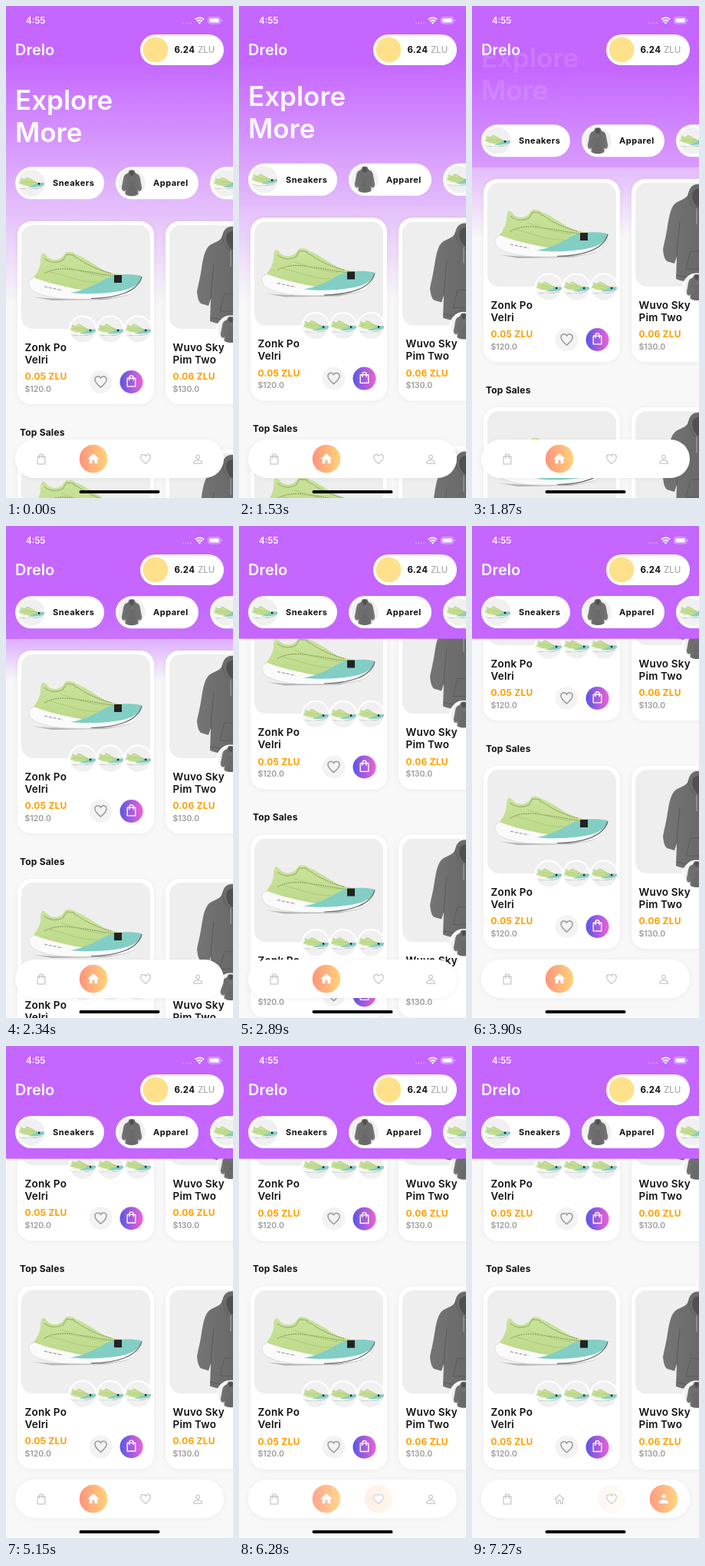
Animation, 296 px wide and 640 px high, one loop 8000 ms. Source, as an HTML page:

```html
<!DOCTYPE html>
<html lang="en">
<head>
<meta charset="utf-8">
<title>Shop screen</title>
<style>
  html, body { margin: 0; width: 100%; height: 100%; overflow: hidden; background: #f8f8f8; }
  svg { display: block; width: 100%; height: 100%; }
  text { font-family: Inter, "Liberation Sans", sans-serif; font-weight: 600; fill: #111; white-space: pre; }
  .panel { fill: #fff; filter: drop-shadow(0 1px 3px rgba(0, 0, 0, .05)); }
  .line { fill: none; stroke: currentColor; stroke-width: 1.8; stroke-linejoin: round; }
  .solid { fill: #fff; }
</style>
</head>
<body>
<svg id="stage" viewBox="0 0 296 640" preserveAspectRatio="none">
  <defs>
    <linearGradient id="glow" gradientUnits="userSpaceOnUse" x1="0" x2="0" y1="70" y2="390">
      <stop stop-color="#c566ff"/><stop offset="1" stop-color="#c566ff" stop-opacity="0"/>
    </linearGradient>
    <linearGradient id="violet"><stop offset=".05" stop-color="#6157e6"/><stop offset="1" stop-color="#f060d6"/></linearGradient>
    <linearGradient id="peach"><stop stop-color="#ff947c"/><stop offset="1" stop-color="#ffd37a"/></linearGradient>
    <linearGradient id="cloth"><stop stop-color="#757575"/><stop offset=".5" stop-color="#696969"/><stop offset="1" stop-color="#757575"/></linearGradient>
    <linearGradient id="knit" x2="0" y2="1"><stop stop-color="#cbe39c"/><stop offset="1" stop-color="#bdd98a"/></linearGradient>
    <clipPath id="round"><circle r="17"/></clipPath>
    <clipPath id="photo"><rect width="168" height="135" rx="15"/></clipPath>

    <g id="shoe">
      <path d="M12 93C40 97 95 97 142 91L110 97 40 98Z" fill="#b4b4b4"/>
      <path d="M10 72C9 78 12 84 18 87 30 93 48 96 65 96 100 97 128 95 143 89 152 84 157 76 157 66L100 70 20 66Z" fill="#fafafa" stroke="#d4d4d4" stroke-width=".7"/>
      <path d="M16 68C21 62 24 55 25 49 25 44 25 40 27 37 30 36 32 38 34 41 39 46 46 46 51 43 55 41 56 37 59 35 63 34 68 35 71 38 78 40 85 45 92 49 102 56 112 62 126 64L155 66C156 72 148 80 130 82 105 86 82 86 62 81 44 77 28 73 16 68Z" fill="url(#knit)"/>
      <path d="M30 43C36 49 46 50 54 46L59 38 68 39 71 43" fill="none" stroke="#a3be72" stroke-width="1.6"/>
      <path d="M64 88C82 85 97 77 111 69 124 64 144 63 156 66 158 74 146 83 128 86 104 90 82 90 64 88Z" fill="#82cec4"/>
      <path d="M30 63C48 53 66 58 82 60 96 62 108 65 120 66M72 42C84 51 101 59 118 63" fill="none" stroke="#7a9150" stroke-width="1" stroke-dasharray="2 1"/>
      <path d="M37 61C58 65 80 76 100 74M52 52C68 58 85 63 109 67" fill="none" stroke="#a3c370" stroke-width=".7"/>
      <path d="M91 95.5C124 95 152 87 157 67" fill="none" stroke="#666" stroke-width="1.2"/>
      <path d="M30 80l24 5" stroke="#999" stroke-width="1.2" stroke-dasharray="4 2"/>
      <rect x="121" y="65" width="10" height="10" fill="#222"/>
    </g>

    <g id="hoodie">
      <path d="M84 2C76 1 71 5 69 14 68 20 60 22 53 26 46 31 44 44 42 56 40 70 37 80 36 87 37 95 38 99 41 102L51 105 54 96 53 125C66 131 102 131 115 125L114 96 117 105 127 102C130 99 131 95 132 87 131 80 128 70 126 56 124 44 122 31 115 26 108 22 100 20 99 14 97 5 92 1 84 2Z" fill="url(#cloth)"/>
      <path d="M75 12C79 6 89 6 93 12 96 22 90 30 84 33 78 30 72 22 75 12Z" fill="#505050"/>
      <path d="M54 96C55 76 57 62 58 50M114 96C113 76 111 62 110 50M66 112L72 89H96L102 112ZM53 120Q84 128 115 120M69 14Q72 33 84 36 96 33 99 14" fill="none" stroke="#5a5a5a" stroke-width="1"/>
      <path d="M80 33V54M88 33V51" stroke="#aaa" stroke-width="1"/>
    </g>

    <path id="bag" d="M5 7h14v14H5zM8.5 11V6a3.5 3.5 0 0 1 7 0v5"/>
    <path id="home" d="M3 12l9-8 9 8M6 10v10h4v-6h4v6h4V10"/>
    <path id="homeFull" d="M10 20v-6h4v6h5v-8h3L12 3 2 12h3v8z"/>
    <path id="heart" d="M12 20.5C6 15.5 3 12.5 3 8.7A4.7 4.7 0 0 1 12 6.3a4.7 4.7 0 0 1 9 2.4C21 12.5 18 15.5 12 20.5z"/>
    <path id="person" d="M12 4.5a3.5 3.5 0 1 0 .01 0zM4.5 20v-2c0-3 5-4.2 7.5-4.2s7.5 1.2 7.5 4.2v2z"/>
  </defs>

  <rect width="296" height="640" fill="#f8f8f8"/>
  <rect id="backdrop" width="296" height="400" fill="url(#glow)"/>
  <g id="content"></g>
  <rect id="header" width="296" fill="#c566ff"/>
  <rect id="bar" width="296" height="78" fill="#c566ff"/>
  <g id="headline"></g>
  <g id="chips"></g>
  <g id="top"></g>
  <g id="nav"></g>
  <rect x="95.5" y="630" width="105" height="4" rx="2"/>
</svg>

<script>
const LOOP = 8000;
const $ = id => document.getElementById(id);
const clamp = (v, lo = 0, hi = 1) => Math.min(hi, Math.max(lo, v));

const label = (x, y, size, str, style = '') =>
  `<text x="${x}" y="${y}" font-size="${size}" style="${style}">${str}</text>`;
const icon = (id, x, y, scale, cls = 'line', color = '#c8c8c8') =>
  `<use href="#${id}" class="${cls}" color="${color}" transform="translate(${x} ${y}) scale(${scale}) translate(-12 -12)"/>`;

// Round thumbnail of a product picture
function thumb(x, y, item, ring) {
  const scale = item === 'shoe' ? .24 : .275;
  return `<g transform="translate(${x} ${y})">
    <circle r="17.5" fill="#f0f0f0" stroke="#fff" stroke-width="${ring}"/>
    <g clip-path="url(#round)"><use href="#${item}" transform="scale(${scale}) translate(-84 -66)"/></g></g>`;
}

function card(x, y, item, lines, price, cost) {
  return `<g transform="translate(${x} ${y})">
    <rect class="panel" width="178" height="238" rx="18"/>
    <g transform="translate(5 5)" clip-path="url(#photo)">
      <rect width="168" height="135" fill="#eee"/><use href="#${item}"/></g>
    ${[85, 121, 157].map(cx => thumb(cx, 141, item, 2)).join('')}
    ${lines.map((line, i) => label(9.5, 168.5 + i * 16, 13.5, line, 'letter-spacing:.2px')).join('')}
    ${label(9.5, 206, 12, price + ' ZLU', 'fill:#ffa000;font-weight:700;letter-spacing:.2px')}
    ${label(9.5, 221.5, 10.5, cost, 'fill:#9c9c9c')}
    <circle cx="108.5" cy="209" r="15" fill="#f3f3f3"/>${icon('heart', 108.5, 209, .83, 'line', '#999')}
    <circle cx="148.5" cy="209" r="15" fill="url(#violet)"/>${icon('bag', 148.5, 208, .76, 'line', '#fff')}
  </g>`;
}

const row = y =>
  card(15, y, 'shoe', ['Zonk Po', 'Velri'], '0.05', '$120.0') +
  card(208, y, 'hoodie', ['Wuvo Sky', 'Pim Two'], '0.06', '$130.0');

const chip = (x, width, item, name) => `
  <rect x="${x}" y="209.3" width="${width}" height="42" rx="21" fill="#fff"/>
  ${thumb(x + 21, 230.3, item, 0)}
  ${label(x + 49, 234.3, 11, name, 'font-weight:700;letter-spacing:.5px')}`;

$('content').innerHTML = row(280) +
  label(18, 558.5, 12, 'Top Sales', 'font-weight:700;letter-spacing:.2px') + row(577);

$('headline').innerHTML = ['Explore', 'More']
  .map((word, i) => label(12, 134.5 + i * 42, 35, word, 'fill:#fff')).join('');

$('chips').innerHTML = chip(12, 116, 'shoe', 'Sneakers') +
  chip(143, 108, 'hoodie', 'Apparel') + chip(266, 116, 'shoe', '');

$('top').innerHTML = label(26, 23, 11.5, '4:55', 'fill:#fff') +
  [0, 1, 2, 3].map(i => `<circle cx="${231 + i * 3.4}" cy="22" r=".8" fill="#fff" opacity=".6"/>`).join('') +
  `<g fill="none" stroke="#fff" stroke-width="1.7">
     <path d="M247 17.5Q252.5 12.8 258 17.5M249 20Q252.5 17 256 20"/></g>
   <path d="M250.5 21.5Q252.5 20 254.5 21.5L252.5 23.5Z" fill="#fff"/>
   <rect x="263.5" y="14.5" width="16" height="8.5" rx="2.5" fill="none" stroke="#fff" opacity=".5"/>
   <rect x="265" y="16" width="13" height="5.5" rx="1.5" fill="#fff"/>
   <path d="M281 17.5v2.5" stroke="#fff" opacity=".6"/>` +
  label(12, 64, 20, 'Drelo', 'fill:#fff') +
  `<rect x="175" y="37" width="109" height="40" rx="20" fill="#fff"/>
   <circle cx="195" cy="57" r="16.5" fill="#ffe18c"/>` +
  label(219.5, 61, 11.5, '6.24', 'font-weight:700;letter-spacing:.2px') +
  label(250, 61, 11.5, 'ZLU', 'fill:#aaa;font-weight:500');

const tabs = [['bag', 'bag', 46], ['home', 'homeFull', 114], ['heart', 'heart', 182], ['person', 'person', 250]];
$('nav').innerHTML = '<rect class="panel" x="12" y="564" width="272" height="50" rx="25"/>' +
  tabs.map(([idle, full, x]) => `<g>
    <g>${icon(idle, x, 589.5, .7)}</g>
    <g><circle cx="${x}" cy="589" r="18.3" fill="url(#peach)"/>${icon(full, x, 589, .76, 'solid')}</g>
  </g>`).join('');
const tabGroups = [...$('nav').querySelectorAll(':scope > g')];

// Screen refreshes: [first, interval, count]; the picture holds in between
const bursts = [[1530, 113.3, 7], [2340, 110, 8], [3220, 113.3, 7], [5150, 115, 3], [6280, 110, 3], [7060, 105, 3]];
function held(t) {
  const burst = bursts.filter(b => b[0] <= t).pop();
  if (!burst) return 0;
  const [first, interval, count] = burst;
  return first + interval * Math.min(count - 1, Math.floor((t - first) / interval));
}

// [time, scroll offset]
const scrollSteps = [[0, 0], [1500, 0], [1870, 55], [2340, 118], [3220, 210], [3560, 242], [3900, 265], [5100, 265], [5380, 264.3], [LOOP, 264.3]];
function scrollAt(t) {
  const i = scrollSteps.findIndex(step => step[0] > t);
  const [t0, a] = scrollSteps[i - 1], [t1, b] = scrollSteps[i];
  return a + (b - a) * (t - t0) / (t1 - t0);
}

function draw(time) {
  const t = held(time);
  const s = scrollAt(t);
  const pinned = Math.min(s, 118.3);
  const move = (id, y) => $(id).setAttribute('transform', `translate(0 ${-y})`);

  move('content', s);
  move('headline', s);
  move('chips', pinned);
  $('headline').setAttribute('opacity', clamp(1 - s / 63));
  $('header').setAttribute('height', 265 - pinned);
  $('header').setAttribute('opacity', clamp(s / 145));
  $('bar').setAttribute('opacity', clamp(s / 55));
  $('glow').setAttribute('y1', 70 + pinned * .2);
  $('glow').setAttribute('y2', 390 - pinned * 1.6);
  $('backdrop').setAttribute('opacity', clamp((150 - s) / 30));

  const swap = start => clamp((t - start + 40) / 270) * (t >= start);
  const toHeart = swap(6280), toPerson = swap(7060);
  [0, 1 - toHeart, toHeart - toPerson, toPerson].forEach((on, i) => {
    const [idle, active] = tabGroups[i].children;
    idle.setAttribute('opacity', 1 - on);
    active.setAttribute('opacity', on);
  });
}

function tick() {
  draw(performance.now() % LOOP);
  requestAnimationFrame(tick);
}
tick();
</script>
</body>
</html>
```
